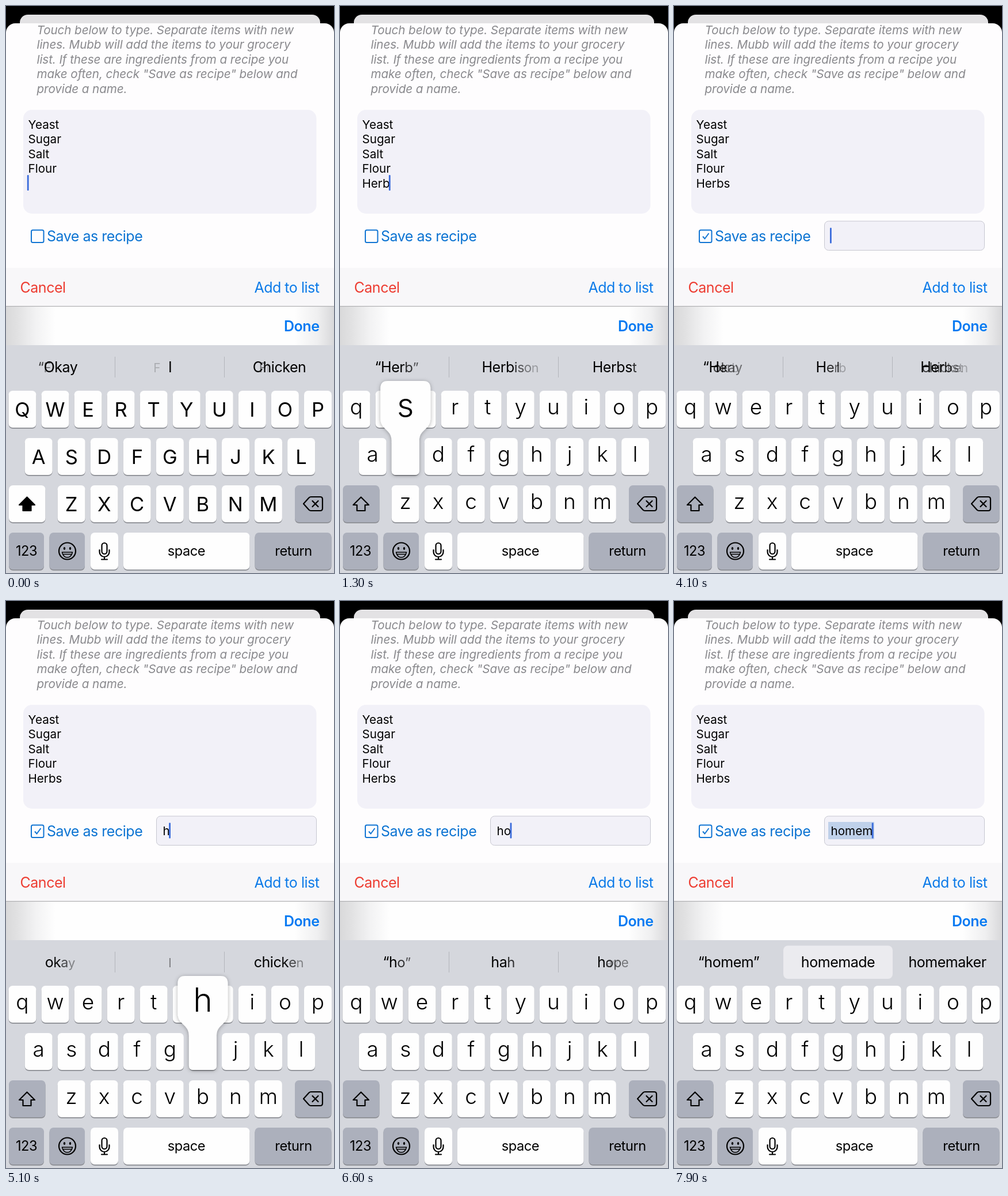
An HTML page for the animation above (8000 ms loop, 570 px wide and 983 px high).

```html
<!DOCTYPE html>
<html lang="en">
<head>
<meta charset="utf-8">
<title>Grocery list</title>
<style>
html, body { margin: 0; width: 100%; height: 100%; overflow: hidden; background: #000; }
svg { display: block; width: 570px; height: 983px; }
text { font-family: Inter, Roboto, sans-serif; font-optical-sizing: none; fill: #000; }
.small { font-size: 20.64px; }
.intro { font-style: italic; letter-spacing: -.004em; fill: #89898d; }
.body { font-size: 25px; letter-spacing: -.019em; }
.label { font-size: 23.6px; letter-spacing: -.02em; text-anchor: middle; }
.key, .big { text-anchor: middle; }
.icon { fill: none; stroke: #000; stroke-width: 2.2; stroke-linecap: round; stroke-linejoin: round; }
.thin { stroke-width: 1.5; }
.end { text-anchor: end; }
</style>
</head>
<body>
<svg id="stage" viewBox="0 0 570 983">
  <defs>
    <linearGradient id="bar">
      <stop offset="0" stop-color="#d9d9da"/><stop offset=".03" stop-color="#e0e0e1"/>
      <stop offset=".09" stop-color="#f2f2f3"/><stop offset=".15" stop-color="#fefefe"/>
      <stop offset=".88" stop-color="#fefefe"/><stop offset=".95" stop-color="#efeff0"/>
      <stop offset="1" stop-color="#d8d8da"/>
    </linearGradient>
    <filter id="shade" x="-30%" y="-20%" width="160%" height="140%">
      <feDropShadow dx="0" dy="1" stdDeviation="3.500" flood-color="#000" flood-opacity=".32"/>
    </filter>
  </defs>
  <rect width="570" height="983"/>
  <rect x="24" y="15" width="522" height="60" rx="14" fill="#e3e2e4"/>
  <rect y="30" width="570" height="500" rx="16" fill="#fefdfe"/>
  <g id="intro"></g>
  <rect x="30" y="180" width="509.500" height="180" rx="15" fill="#f2f1f8"/>
  <g id="items"></g>
  <text id="entry" class="small" x="38.500" y="314.600"></text>
  <rect x="44" y="388.500" width="21.500" height="21.500" rx="2.500" fill="none" stroke="#1175d3" stroke-width="2"/>
  <text class="body" x="71" y="408" style="fill:#0b73d2">Save as recipe</text>
  <g id="recipe">
    <path d="M50 399.500L53.500 403.500L60.500 394" fill="none" stroke="#1175d3" stroke-width="2"/>
    <rect x="261.500" y="373" width="278" height="50.500" rx="7" fill="#f2f1f8" stroke="#c7c7d0"/>
    <rect id="selection" x="268" y="383" width="80" height="30" fill="#bfd1ea"/>
    <text id="name" class="small" x="272.500" y="405.500"></text>
  </g>
  <rect id="caret" width="2.800" height="27" rx="1" fill="#3a6bdb"/>
  <rect y="454" width="570" height="67" fill="#f8f7f9"/>
  <text class="body" x="24.500" y="497" style="fill:#ed3c31">Cancel</text>
  <text class="body end" x="544.500" y="497" style="fill:#0c7ae8">Add to list</text>
  <rect y="520" width="570" height="68" fill="url(#bar)"/>
  <rect y="520" width="570" height="1.200" fill="#b0b0b2"/>
  <text class="body end" x="544.500" y="564" style="fill:#067af2;font-weight:600">Done</text>
  <rect y="588" width="570" height="395" fill="#d5d7dd"/>
  <rect id="pill" x="190" y="597.500" width="190" height="57.500" rx="8" fill="#ebebef"/>
  <path id="dividers" d="M189.500 608V644M379.500 608V644" stroke="#b3b5bb"/>
  <g id="words"></g>
  <g id="keys"></g>
  <g id="popup" filter="url(#shade)">
    <path fill="#fefefe"/>
  </g>
  <text id="popupLetter" class="big" font-weight="300"></text>
</svg>
<script>
const $ = id => document.getElementById(id);
const clamp = v => Math.max(0, Math.min(1, v));
const DURATION = 8000, STEP = 100, HOLD = 210;

function add(parent, tag, attrs = {}, content = '') {
  const node = document.createElementNS('http://www.w3.org/2000/svg', tag);
  for (const k in attrs) node.setAttribute(k, attrs[k]);
  node.textContent = content;
  parent.appendChild(node);
  return node;
}
const show = (node, on) => node.setAttribute('visibility', on ? 'visible' : 'hidden');

function lines(parent, list, x, y, cls) {
  list.forEach((s, i) => add(parent, 'text', { class: cls, x, y: y + i * 25.4 }, s));
}
lines($('intro'), [
  'Touch below to type. Separate items with new',
  'lines. Mubb will add the items to your grocery',
  'list. If these are ingredients from a recipe you',
  'make often, check "Save as recipe" below and',
  'provide a name.'
], 53.5, 49, 'small intro');
lines($('items'), ['Yeast', 'Sugar', 'Salt', 'Flour'], 38.5, 213, 'small');

// Keyboard
const keys = $('keys'), GREY = '#acb0bc', WHITE = '#fefefe';
const letters = {};
function cap(x, y, width, fill) {
  add(keys, 'rect', { x, y: y + 1.8, width, height: 64, rx: 7, fill: '#8b8d93' });
  return add(keys, 'rect', { x, y, width, height: 64, rx: 7, fill });
}
[['qwertyuiop', 28.5], ['asdfghjkl', 56.7], ['zxcvbnm', 113.6]].forEach(([row, x0], r) => {
  [...row].forEach((ch, i) => {
    const x = x0 + i * 57.05, y = 667 + r * 82;
    cap(x - 24, y, 48, WHITE);
    letters[ch] = { x, y, node: add(keys, 'text', { class: 'key', x }, ch) };
  });
});
const shiftCap = cap(5, 831, 63.5, GREY);
cap(502, 831, 63.5, GREY);
cap(5, 913, 61, GREY);
cap(75.5, 913, 61.5, GREY);
cap(147, 913, 48, WHITE);
cap(204, 913, 219.5, WHITE);
cap(432.5, 913, 133, GREY);
const icon = (d, cls = 'icon') => add(keys, 'path', { class: cls, d });
const shiftIcon = icon('M36.5 851.5L50 865H43.5V875H29.5V865H23Z');
icon('M517 863L526.5 852.5Q528 851 530 851H546Q550 851 550 855V871Q550 875 546 875H530Q528 875 526.5 873.5ZM532.5 858L542.5 868M542.5 858L532.5 868');
add(keys, 'circle', { class: 'icon', cx: 106.5, cy: 945, r: 14.5 });
add(keys, 'ellipse', { cx: 101.5, cy: 940.5, rx: 1.7, ry: 2.4 });
add(keys, 'ellipse', { cx: 111.5, cy: 940.5, rx: 1.7, ry: 2.4 });
icon('M97.5 947H115.5Q113.5 956 106.5 956T97.5 947ZM99.5 950.5H113.5', 'icon thin');
add(keys, 'rect', { class: 'icon', x: 166.5, y: 931, width: 9, height: 19, rx: 4.5 });
icon('M162.5 943V946.5A8.5 8.5 0 0 0 179.5 946.5V943M171 955V959.5M166 959.5H176');
[['123', 35.5], ['space', 313.5], ['return', 499.5]].forEach(([s, x]) =>
  add(keys, 'text', { class: 'label', x, y: 953 }, s));

// Key presses: time, letter, resulting suggestions
const presses = [
  [300, 'H', '“H”', 'He', 'Have'],
  [600, 'e', '“He”', 'Hey', 'Here'],
  [800, 'r', '“Her”', 'Herb', 'Herbs'],
  [1090, 'b', '“Herb”', 'Herbison', 'Herbst'],
  [1300, 's', '“Herbs”', 'Herbst', 'Herbst’s'],
  [4950, 'h', '“h”', 'haw', 'have'],
  [6390, 'o', '“ho”', 'hah', 'hope'],
  [6660, 'm', '“hom”', 'how', 'home'],
  [6900, 'e', '“home”', 'home', 'homework'],
  [7400, 'm', '“homem”', 'homemade', 'homemaker']
];
const CHECKED = 3200, FOCUS = 4000, CORRECTED = 7700, TYPE_DELAY = 100;
const suggestions = [
  [-1000, '“Flour”', 'Flour', 'Flours'],
  [-240, 'Okay', 'I', 'Chicken'],
  [FOCUS - 50, 'okay', 'I', 'chicken'],
  ...presses.map(([at, , ...w]) => [at + TYPE_DELAY, ...w])
].sort((a, b) => a[0] - b[0]);

const slots = [95, 285, 475].map(center => ({
  center,
  old: add($('words'), 'text', { class: 'body', y: 635 }),
  now: add($('words'), 'text', { class: 'body', y: 635 })
}));

function startX(node, word, center) {
  node.textContent = word;
  return center - node.getComputedTextLength() / 2;
}

function spell(node, word, shared, alpha) {
  node.textContent = '';
  [...word].forEach((ch, i) => {
    const a = clamp(alpha(i));
    add(node, 'tspan', {
      'fill-opacity': a,
      style: `font-size:${i < shared ? 25 : 25 * (0.8 + 0.2 * a)}px`
    }, ch);
  });
}

// Letters both words begin with slide; the others fade one after another
function morph({ center, old, now }, from, to, elapsed) {
  const x0 = startX(old, from, center), x1 = startX(now, to, center);
  if (elapsed > 500 || from === to) {
    old.textContent = '';
    now.setAttribute('x', x1);
    return;
  }
  let shared = 0;
  while (shared < to.length && from[shared] === to[shared]) shared++;
  const fresh = shared === 0;
  const x = fresh ? x1 : x0 + (x1 - x0) * clamp(elapsed / 250);
  old.setAttribute('x', fresh ? x0 : x);
  now.setAttribute('x', x);
  spell(old, from, shared, i => i < shared ? 0 :
    1 - (elapsed + 40 - (fresh ? 40 : 25) * (from.length - 1 - i)) / 150);
  spell(now, to, shared, i => i < shared ? 1 : fresh
    ? (elapsed - 60 - 10 * i) / 120
    : (elapsed + 30 - 30 * (i - shared)) / 180);
}

function drawPopup(t) {
  const press = presses.find(([at]) => t >= at && t < at + HOLD);
  show($('popup'), press);
  show($('popupLetter'), press);
  if (!press) return;
  const ch = press[1], { x, y } = letters[ch.toLowerCase()], top = y - 99;
  $('popup').firstElementChild.setAttribute('d',
    `M${x - 43.5} ${top + 13}q0-13 13-13h61q13 0 13 13v52
     c0 20-19.5 18-19.5 39v52q0 7-7 7h-34q-7 0-7-7v-52c0-21-19.5-19-19.5-39z`);
  const label = $('popupLetter');
  label.textContent = ch;
  label.setAttribute('x', x);
  label.setAttribute('y', top + 62);
  label.setAttribute('font-size', ch === 'H' ? 52 : 57);
}

function drawKeys(upper) {
  for (const ch in letters) {
    const { y, node } = letters[ch];
    node.textContent = upper ? ch.toUpperCase() : ch;
    node.setAttribute('y', y + (upper ? 44.5 : 40.5));
    node.setAttribute('font-size', upper ? 34.5 : 37);
    node.setAttribute('font-weight', upper ? 400 : 350);
  }
  shiftCap.setAttribute('fill', upper ? WHITE : GREY);
  shiftIcon.style.fill = upper ? '#000' : 'none';
}

function draw(t) {
  const typed = presses.filter(([at]) => t >= at + TYPE_DELAY);
  const join = test => typed.filter(([at]) => test(at)).map(p => p[1]).join('');
  $('entry').textContent = join(at => at < FOCUS);
  $('name').textContent = join(at => at > FOCUS);
  show($('recipe'), t >= CHECKED);
  const corrected = t >= CORRECTED;
  $('selection').setAttribute('opacity', corrected ? 1 : 0);
  show($('pill'), corrected);
  show($('dividers'), !corrected);

  const inField = t >= FOCUS, line = inField ? $('name') : $('entry');
  const width = line.textContent ? line.getComputedTextLength() : 0;
  const moved = Math.max(-100, inField ? FOCUS : -100, ...typed.map(p => p[0] + TYPE_DELAY));
  const phase = (t - moved) % 1000;
  const caret = $('caret');
  caret.setAttribute('x', (inField ? 271 : 36.8) + width);
  caret.setAttribute('y', inField ? 384.5 : 293);
  caret.setAttribute('opacity', phase < 500 ? 1 : phase < 600 ? 0.5 : phase < 900 ? 0 : 0.5);

  let n = 1;
  while (suggestions[n + 1] && suggestions[n + 1][0] <= t) n++;
  const [since, ...words] = suggestions[n];
  slots.forEach((slot, i) => morph(slot, suggestions[n - 1][i + 1], words[i], t - since));
  drawKeys(t < 500);
  drawPopup(t);
}

const begun = performance.now();
let last = -1;
function tick() {
  const elapsed = Math.max(0, performance.now() - begun) % DURATION;
  const t = Math.floor(elapsed / STEP) * STEP;
  if (t !== last) draw(last = t);
  requestAnimationFrame(tick);
}
tick();
</script>
</body>
</html>
```
